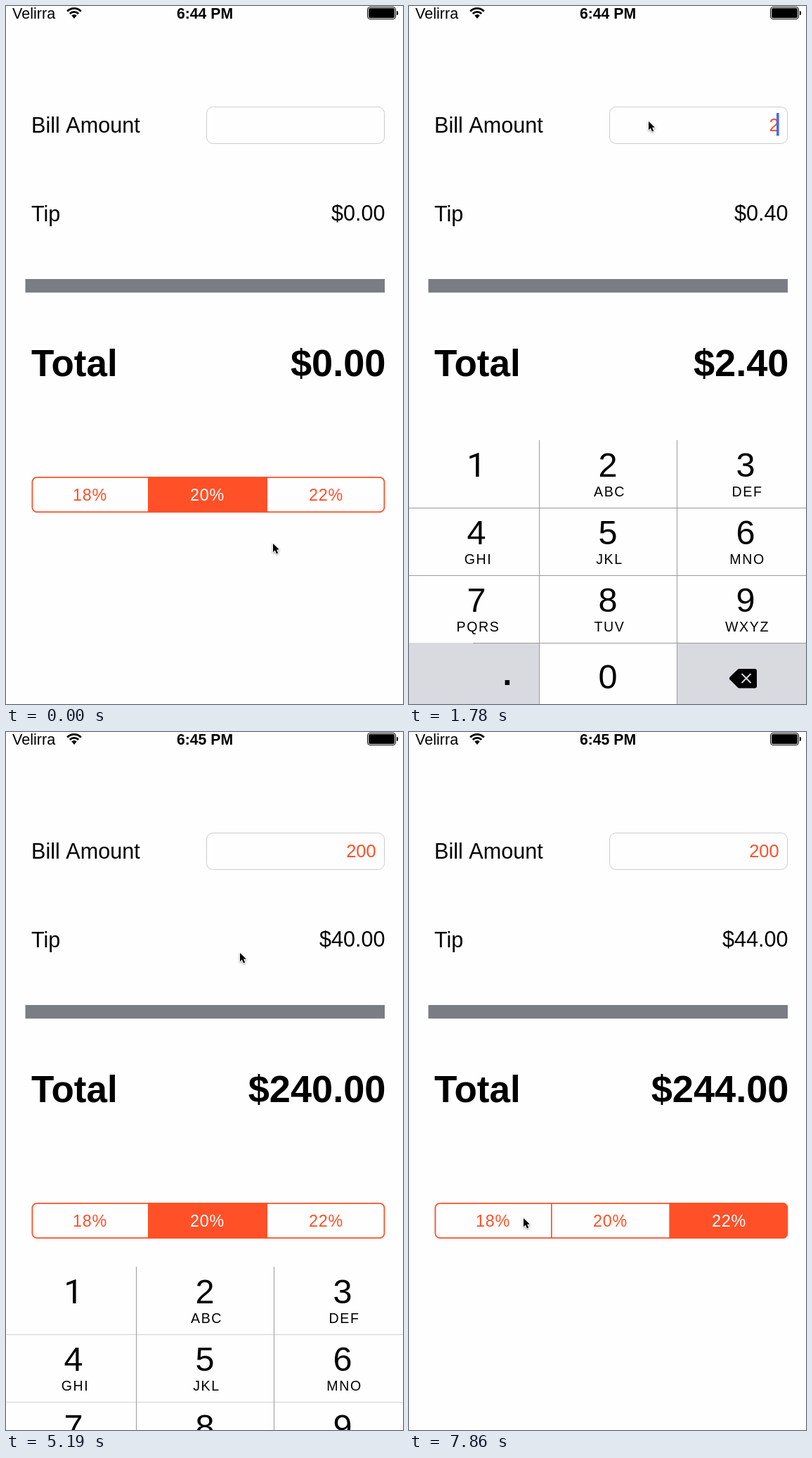
Animation, 565 px wide and 992 px high, one loop 8000 ms. Source, as an HTML page with a canvas:

```html
<!DOCTYPE html>
<html lang="en">
<head>
<meta charset="utf-8">
<title>Tip calculator</title>
<style>
  html, body { margin: 0; width: 100%; height: 100%; overflow: hidden; background: #fefefe; }
  canvas { display: block; }
</style>
</head>
<body>
<canvas id="stage" width="565" height="992"></canvas>
<script>
const ctx = document.getElementById('stage').getContext('2d');
const LOOP = 8000, STEP = 148.3;
const PAPER = '#fefefe', KEY_GRAY = '#d9dadf', RULE = '#9b9b9e';
const ORANGE = [255, 80, 40], WHITE = [254, 254, 254];
const SANS = '"Liberation Sans", Arial, sans-serif';
const FOOTLESS = 'Roboto, sans-serif'; // its "1" has no base bar

const rgb = c => `rgb(${c.map(Math.round).join()})`;
const mix = (a, b, p) => rgb(a.map((v, i) => v + (b[i] - v) * p));

function text(str, x, y, size,
    { align = 'left', color = '#000', weight = 'normal', spacing = 0, family = SANS } = {}) {
  ctx.font = `${weight} ${size}px ${family}`;
  ctx.textAlign = align;
  ctx.letterSpacing = spacing + 'px';
  ctx.fillStyle = color;
  ctx.fillText(str, x, y);
}

function rect(x, y, w, h, color) {
  ctx.fillStyle = color;
  ctx.fillRect(x, y, w, h);
}

function roundRect(x, y, w, h, r) {
  ctx.beginPath();
  ctx.roundRect(x, y, w, h, r);
}

function polygon(points) {
  ctx.beginPath();
  points.forEach(([x, y]) => ctx.lineTo(x, y));
  ctx.closePath();
}

// Pointer stops: [step, x, y, easing into the stop]
const linear = p => p;
const smooth = p => (1 - Math.cos(Math.PI * p)) / 2;
const POINTER = [
  [0, 380, 763, linear], [1, 368, 680, linear], [2, 322, 400, linear],
  [3, 299, 185, linear], [4, 336, 158, linear], [6, 336, 158, linear],
  [7, 337, 160, linear], [12, 341, 163, smooth], [28, 341, 163, linear],
  [30, 340, 151, linear], [31, 337, 165, linear], [32, 331, 215, linear],
  [33, 329, 275, linear], [34, 333, 313, linear], [35, 333, 313, linear],
  [42, 451, 694, smooth], [46, 451, 694, linear], [53, 163, 690, smooth]
];

function pointerAt(step) {
  const i = POINTER.findIndex(stop => stop[0] >= step);
  if (i <= 0) return POINTER[0].slice(1, 3);
  const [s0, x0, y0] = POINTER[i - 1], [s1, x1, y1, ease] = POINTER[i];
  const p = ease((step - s0) / (s1 - s0));
  return [x0 + (x1 - x0) * p, y0 + (y1 - y0) * p];
}

// Critically damped spring, 0 to 1
function spring(ms) {
  const w = Math.max(0, ms) * 0.01826;
  return 1 - (1 + w) * Math.exp(-w);
}

const FOCUS = 6, BLUR = 35;
const KEYSTROKES = [[12, 2], [14, 20], [17, 200]];

function caretAlpha(step) {
  if (step < FOCUS || step >= BLUR) return 0;
  const last = KEYSTROKES.reduce((s, [at]) => at <= step ? at : s, FOCUS);
  const idle = step - last - 4;
  return idle < 0 ? 1 : [0.85, 0, 0, 0.5, 1, 1][idle % 6];
}

function statusBar(step) {
  text('Velirra', 9, 18, 21.6);
  text(step < 18 ? '6:44 PM' : '6:45 PM', 283, 18, 21.2, { align: 'center', weight: 'bold' });

  ctx.strokeStyle = '#000';
  ctx.lineWidth = 2.8;
  for (const r of [8.6, 13.6]) {
    ctx.beginPath();
    ctx.arc(97, 17, r, -Math.PI * 0.755, -Math.PI * 0.245);
    ctx.stroke();
  }
  ctx.fillStyle = '#000';
  ctx.beginPath();
  ctx.moveTo(97, 18);
  ctx.arc(97, 17, 5, -Math.PI * 0.76, -Math.PI * 0.24);
  ctx.fill();

  ctx.lineWidth = 1;
  roundRect(514.5, 1.5, 40, 17, 3.5);
  ctx.stroke();
  roundRect(516, 3, 37, 14, 2);
  ctx.fill();
  roundRect(556, 7, 2, 6, [0, 2, 2, 0]);
  ctx.fill();
}

function form(bill, rate) {
  const money = v => '$' + v.toFixed(2);
  const right = { align: 'right' }, bold = { weight: 'bold' };
  text('Bill Amount', 36, 180, 30.6);
  roundRect(285.5, 143.5, 253, 52, 9);
  ctx.lineWidth = 1;
  ctx.strokeStyle = '#cdcdcd';
  ctx.stroke();
  if (bill) text(bill, 526.5, 178, 25.4, { ...right, color: rgb(ORANGE) });

  text('Tip', 36, 306, 30.6);
  text(money(bill * rate), 539.5, 305, 30.6, right);
  rect(27.5, 388, 511.5, 19.3, '#7b7d85');
  text('Total', 36, 526, 53, bold);
  text(money(bill * (1 + rate)), 540.5, 526, 54.2, { ...right, ...bold });
}

function segments(step) {
  const fade = step < 44 ? 0 : step === 44 ? 0.78 : 1;
  const chosen = [0, 1 - fade, fade];
  const edges = [37, 202, 372, 539];
  ctx.save();
  roundRect(37, 669, 502, 51, 7);
  ctx.clip();
  ['18%', '20%', '22%'].forEach((label, i) => {
    const pressed = step === 43 && i === 2 ? 0.2 : 0;
    const fill = mix(WHITE, ORANGE, Math.max(chosen[i], pressed));
    rect(edges[i], 669, edges[i + 1] - edges[i], 51, fill);
    text(label, [119.4, 286.6, 455.4][i], 703, 23.3,
      { align: 'center', color: mix(ORANGE, WHITE, chosen[i]), spacing: 0.8 });
  });
  rect(202, 669, 1.7, 51, rgb(ORANGE));
  rect(370.3, 669, 1.7, 51, rgb(ORANGE));
  ctx.restore();
  ctx.strokeStyle = rgb(ORANGE);
  ctx.lineWidth = 1.8;
  roundRect(37.4, 669.9, 501, 49.2, 6.5);
  ctx.stroke();
}

const LETTERS = ['', 'ABC', 'DEF', 'GHI', 'JKL', 'MNO', 'PQRS', 'TUV', 'WXYZ'];
const COLUMNS = [96, 283, 479], ROW = 96;

function deleteKey() {
  ctx.fillStyle = ctx.strokeStyle = '#000';
  ctx.lineJoin = 'round';
  ctx.lineWidth = 6;
  polygon([[459, 338.5], [470, 328], [492, 328], [492, 349.5], [470, 349.5]]);
  ctx.fill();
  ctx.stroke();
  ctx.strokeStyle = KEY_GRAY;
  ctx.lineWidth = 2;
  ctx.beginPath();
  for (const d of [-6.5, 6.5]) {
    ctx.moveTo(480 - 6.5, 338.5 - d);
    ctx.lineTo(480 + 6.5, 338.5 + d);
  }
  ctx.stroke();
}

function keypad(drop) {
  const top = 617 + Math.round(drop);
  if (top >= 992) return;
  ctx.save();
  ctx.translate(0, top);
  rect(0, 0, 565, 390, PAPER);
  rect(0, 288, 185, 100, KEY_GRAY);
  rect(382, 288, 183, 100, KEY_GRAY);
  const rule = drop > 1 ? '#d2d2d5' : RULE;
  rect(0, ROW, 565, 1, rule);
  rect(0, ROW * 2, 565, 1, rule);
  rect(91, ROW * 3, 474, 1, rule);
  rect(185, 0, 1, 390, RULE);
  rect(381, 0, 1, 390, RULE);

  LETTERS.forEach((letters, i) => {
    const x = COLUMNS[i % 3], y = Math.floor(i / 3) * ROW;
    text(i + 1, x, y + 52, 48.6, { align: 'center', family: i ? SANS : FOOTLESS });
    text(letters, x + 2.5, y + 80, 19.6, { align: 'center', spacing: 1.6 });
  });
  text('0', 283, 353, 48.6, { align: 'center' });
  text('.', 140, 348, 46, { align: 'center', weight: 'bold' });
  deleteKey();
  ctx.restore();
}

function pointer([x, y]) {
  ctx.save();
  ctx.translate(x, y);
  polygon([[0, 1], [0, 13.2], [2.8, 10.6], [5, 15.4], [7.2, 14.4], [5.1, 9.8], [8.8, 9.6]]);
  ctx.shadowColor = 'rgba(0,0,0,.4)';
  ctx.shadowBlur = 3;
  ctx.shadowOffsetY = 1;
  ctx.lineJoin = 'round';
  ctx.lineWidth = 1.8;
  ctx.strokeStyle = '#fff';
  ctx.stroke();
  ctx.shadowColor = 'transparent';
  ctx.fillStyle = '#000';
  ctx.fill();
  ctx.restore();
}

function draw(ms) {
  // The screen refreshes in steps, so motion is sampled once per step.
  const step = Math.min(53, Math.floor((ms + 8) / STEP));
  const time = step * STEP;
  const bill = KEYSTROKES.reduce((v, [at, value]) => at <= step ? value : v, 0);
  const drop = 381 * (1 - spring(time - 879) + spring(time - 5119));

  rect(0, 0, 565, 992, PAPER);
  statusBar(step);
  form(bill, step < 44 ? 0.2 : 0.22);
  segments(step);
  keypad(drop);
  ctx.globalAlpha = caretAlpha(step);
  rect(523, 152, 3.6, 32.5, '#436cf0');
  ctx.globalAlpha = 1;
  pointer(pointerAt(step));
}

const start = performance.now();
function tick() {
  draw((performance.now() - start) % LOOP);
  requestAnimationFrame(tick);
}
tick();
</script>
</body>
</html>
```
